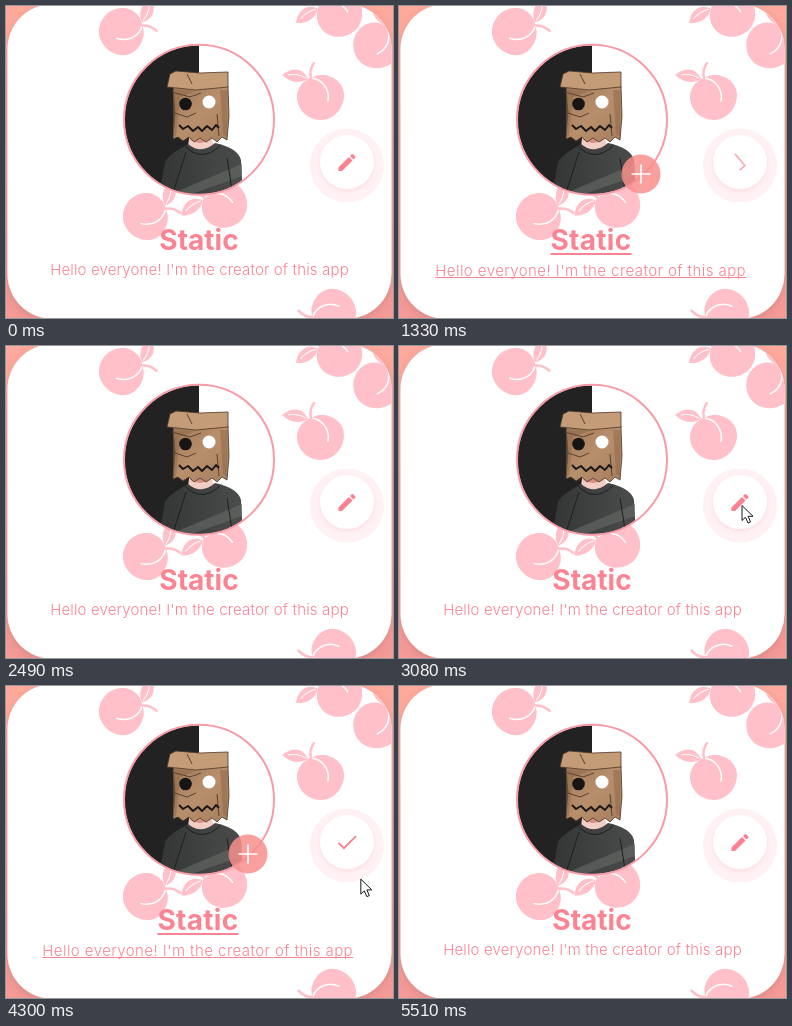
An HTML page that plays this animation: 387 px wide and 312 px high, repeating every 6.37 s.

```html
<!DOCTYPE html>
<html lang="en">
<head>
<meta charset="utf-8">
<title>Profile card</title>
<style>
  html, body { margin: 0; width: 100%; height: 100%; overflow: hidden; background: #f9a09c; }
  svg { display: block; width: 100vw; height: 100vh; }
  text { font-family: Inter, Roboto, sans-serif; text-anchor: middle; fill: #fb8493; }
  #title { font-size: 28px; font-weight: 700; }
  #bio { font-size: 15px; font-weight: 300; }
</style>
</head>
<body>
<svg viewBox="0 0 387 312">
  <defs>
    <linearGradient id="backdrop" x2="0" y2="1">
      <stop stop-color="#ffaa9d"/><stop offset="1" stop-color="#f49a97"/>
    </linearGradient>
    <linearGradient id="paper" x2="1" y2="1">
      <stop stop-color="#a37a59"/><stop offset=".5" stop-color="#b88f6c"/><stop offset="1" stop-color="#a57e5e"/>
    </linearGradient>
    <linearGradient id="shirt">
      <stop stop-color="#343635"/><stop offset="1" stop-color="#4a4d4b"/>
    </linearGradient>
    <filter id="cardShadow" x="-10%" y="-10%" width="120%" height="120%">
      <feDropShadow dx="0" dy="3" stdDeviation="5" flood-color="#7a4648" flood-opacity=".22"/>
    </filter>
    <filter id="buttonShadow" x="-30%" y="-30%" width="160%" height="160%">
      <feDropShadow dx="0" dy="2" stdDeviation="2" flood-color="#f6a5b2" flood-opacity=".25"/>
    </filter>
    <clipPath id="cardClip"><rect x="1.500" y="-2" width="384" height="315" rx="45"/></clipPath>
    <clipPath id="avatarClip"><circle cx="193" cy="113.800" r="74.500"/></clipPath>
    <g id="peach">
      <path fill="#ffc0c9" d="M-7-20C5-26 24-18 24-2C24 12 13 23 1 23C-13 23-23 12-23 0C-23-9-17-17-7-20Z"/>
      <path fill="none" stroke="#fff" stroke-width="1.500" stroke-linecap="round" d="M-9-19C2-18 10-8 8 4"/>
      <path fill="#ffc0c9" d="M-12-18C-17-30-29-30-38-22C-30-14-20-13-12-18Z"/>
      <path fill="none" stroke="#ffc0c9" stroke-width="2.500" stroke-linecap="round" d="M-9-19Q-11-27-6-34"/>
      <path fill="none" stroke="#fff" d="M-14-19Q-23-24-32-22"/>
    </g>
  </defs>

  <rect width="387" height="312" fill="url(#backdrop)"/>
  <rect x="1.500" y="-2" width="384" height="315" rx="45" fill="#fff" filter="url(#cardShadow)"/>
  <g id="peaches" clip-path="url(#cardClip)"></g>

  <g clip-path="url(#avatarClip)">
    <path fill="#fff" d="M193 38h76v152h-76z"/>
    <path fill="#222223" d="M117 38h76v152h-76z"/>
    <path fill="#f1cdc4" d="M184 126h20l4 14-14 8-12-8z"/>
    <path fill="#d98f88" d="M184 130h20v4q-10 6-20 0z"/>
    <path fill="url(#shirt)" d="M182 138Q195 149 209 137Q232 142 235 154L237 190H153L159 156Q161 150 182 138Z"/>
    <path fill="#666967" opacity=".6" d="M236 158L160 190H180L236 170Z"/>
    <path fill="none" stroke="#1d1f1e" d="M179 140Q195 157 214 140M180 146L166 190M221 152L227 190"/>
    <path fill="url(#paper)" stroke="#4b3728" stroke-width=".8" stroke-linejoin="round"
      d="M167 80H222L223 110 221 134 216 131 211 136 206 132 200 136 194 132 188 136 183 131 177 135 172 131 167 133 169 106Z"/>
    <path fill="#c59c78" stroke="#4b3728" stroke-width=".8" d="M164 68L170 65 194 67 222 66 222 81 190 84 161 81Z"/>
    <path fill="#8e6849" opacity=".5" d="M167 83L190 85 174 91 170 130 167 132ZM214 84H222L221 131 217 128Z"/>
    <path fill="none" stroke="#59422f" d="M166 86L184 91 195 87M181 68L186 78M169 107L181 111 190 107M211 108L213 130"/>
    <circle cx="179.500" cy="98" r="6.300" fill="#161514"/>
    <circle cx="203" cy="96" r="6.500" fill="#fff"/>
    <path fill="none" stroke="#1b1816" stroke-width="2" stroke-linejoin="round"
      d="M173 119l4 4 5-3 5 5 5-4 4 4 5-5 5 4 4-5 3 3"/>
  </g>
  <circle cx="193" cy="113.800" r="75" fill="none" stroke="#f99ba7" stroke-width="2"/>

  <g id="plus">
    <circle r="19.500" fill="#f88f8c" fill-opacity=".85"/>
    <path d="M-9.500 0H9.500M0-9.500V9.500" stroke="#fff" stroke-width="1.600"/>
  </g>

  <text id="title">Static</text>
  <text id="bio">Hello everyone! I'm the creator of this app</text>
  <path id="titleLine" stroke="#fb8493" stroke-width="2"/>
  <path id="bioLine" stroke="#fb8493"/>

  <circle cx="341" cy="159.500" r="37" fill="#fff1f4"/>
  <circle cx="341" cy="156" r="27" fill="#fff" filter="url(#buttonShadow)"/>
  <g id="pencil"><path fill="#fb8090" transform="scale(.95) translate(-12 -12)"
    d="M3 17.250V21h3.750L17.810 9.940l-3.750-3.750zM20.710 7.040a1 1 0 0 0 0-1.410l-2.340-2.340a1 1 0 0 0-1.410 0l-1.830 1.830 3.750 3.750z"/></g>
  <g id="check"><path fill="none" stroke="#fb8090" stroke-width="1.800" d="M-8.500 .3L-3 5.700 9-6.300"/></g>
  <path id="cursor" fill="#fff" stroke="#17181f" stroke-linejoin="round"
    d="M1 1.500V16.500L4.500 13.300 7 19 9.500 18 7.100 12.300H12Z"/>
</svg>
<script>
const LOOP = 6370;
const EXIT = 285, ENTER = 330, LEAVE = 240, GLIDE = 150;
const BUTTON = [341, 156.5];

// The pointer shows up at `from`, glides to `to`, clicks, and leaves the stage.
const CLICKS = [
  { seen: 440, glide: 440, click: 1010, from: [373, 178], to: [334, 154], exit: [400, 168] },
  { seen: 1630, glide: 1630, click: 2160, from: [363, 173], to: [348, 158], exit: [400, 175] },
  { seen: 2930, glide: 2930, click: 3370, from: [376, 199], to: [342, 158], exit: [400, 180] },
  { seen: 4000, glide: 4300, click: 5090, from: [354, 192], to: [340, 162], exit: [361, 320] }
];

const PEACHES = [
  { x: 116, y: 25, turn: 100 }, { x: 333, y: 8, turn: -42 }, { x: 370, y: 39, turn: 55 },
  { x: 314, y: 91, turn: 0 }, { x: 140, y: 210, turn: 95 }, { x: 218, y: 199, turn: -44 },
  { x: 327, y: 307, turn: -76 }
];

const $ = id => document.getElementById(id);
const clamp = v => Math.max(0, Math.min(1, v));
const easeOut = (p, power) => 1 - (1 - p) ** power;
const mix = (a, b, p) => a.map((v, i) => v + (b[i] - v) * p);
const set = (id, attrs) => Object.entries(attrs).forEach(([k, v]) => $(id).setAttribute(k, v));

$('peaches').innerHTML = PEACHES.map(({ x, y, turn }) =>
  `<use href="#peach" transform="translate(${x} ${y}) rotate(${turn})"/>`).join('');

function place(id, [x, y], scale, turn, opacity) {
  set(id, { transform: `translate(${x} ${y}) rotate(${turn}) scale(${scale})`, opacity });
}

function drawPointer(t) {
  const visit = CLICKS.find(v => t >= v.seen && t < v.click + LEAVE);
  set('cursor', { visibility: visit ? 'visible' : 'hidden' });
  if (!visit) return;
  const { glide, click, from, to, exit } = visit;
  const rest = mix(from, to, easeOut(clamp((t - glide) / GLIDE), 2));
  const [x, y] = mix(rest, exit, easeOut(clamp((t - click) / LEAVE), 2));
  set('cursor', { transform: `translate(${x} ${y})` });
}

function drawText(id, x, y, lineY, editing, spacing) {
  $(id).style.letterSpacing = spacing + 'px';
  set(id, { x, y });
  const half = $(id).getComputedTextLength() / 2;
  set(id + 'Line', { d: `M${x - half} ${lineY}H${x + half}`, visibility: editing ? 'visible' : 'hidden' });
}

function drawIcons(editing, since) {
  const [next, last] = editing ? ['check', 'pencil'] : ['pencil', 'check'];
  const leave = clamp(since / EXIT) ** 2;
  const enter = clamp((since - EXIT) / ENTER);
  const rest = (1 - enter) ** 6.5;
  place(last, BUTTON, 1 - 0.3 * leave, 180 * leave, 1 - leave);
  place(next, BUTTON, 1 - 0.2 * rest, -180 * rest, enter > 0 ? 1 - 0.7 * rest : 0);
}

function render(t) {
  const past = CLICKS.filter(v => v.click <= t);
  const editing = past.length % 2 === 1;
  const since = past.length ? t - past.at(-1).click : LOOP;

  drawText('title', editing ? 192 : 193, 244, 248, editing, editing ? 0.28 : 0);
  drawText('bio', editing ? 191.7 : 193.5, editing ? 270 : 269, 271.5, editing, editing ? 0.43 : 0.15);
  drawIcons(editing, editing ? since : since / 0.65);

  const p = clamp(since / 300), shown = editing ? easeOut(p, 3) : 1 - p * p;
  place('plus', [242, 168], shown, 0, shown);
  drawPointer(t);
}

const start = performance.now();
function tick() {
  render((performance.now() - start) % LOOP);
  requestAnimationFrame(tick);
}
tick();
</script>
</body>
</html>
```
